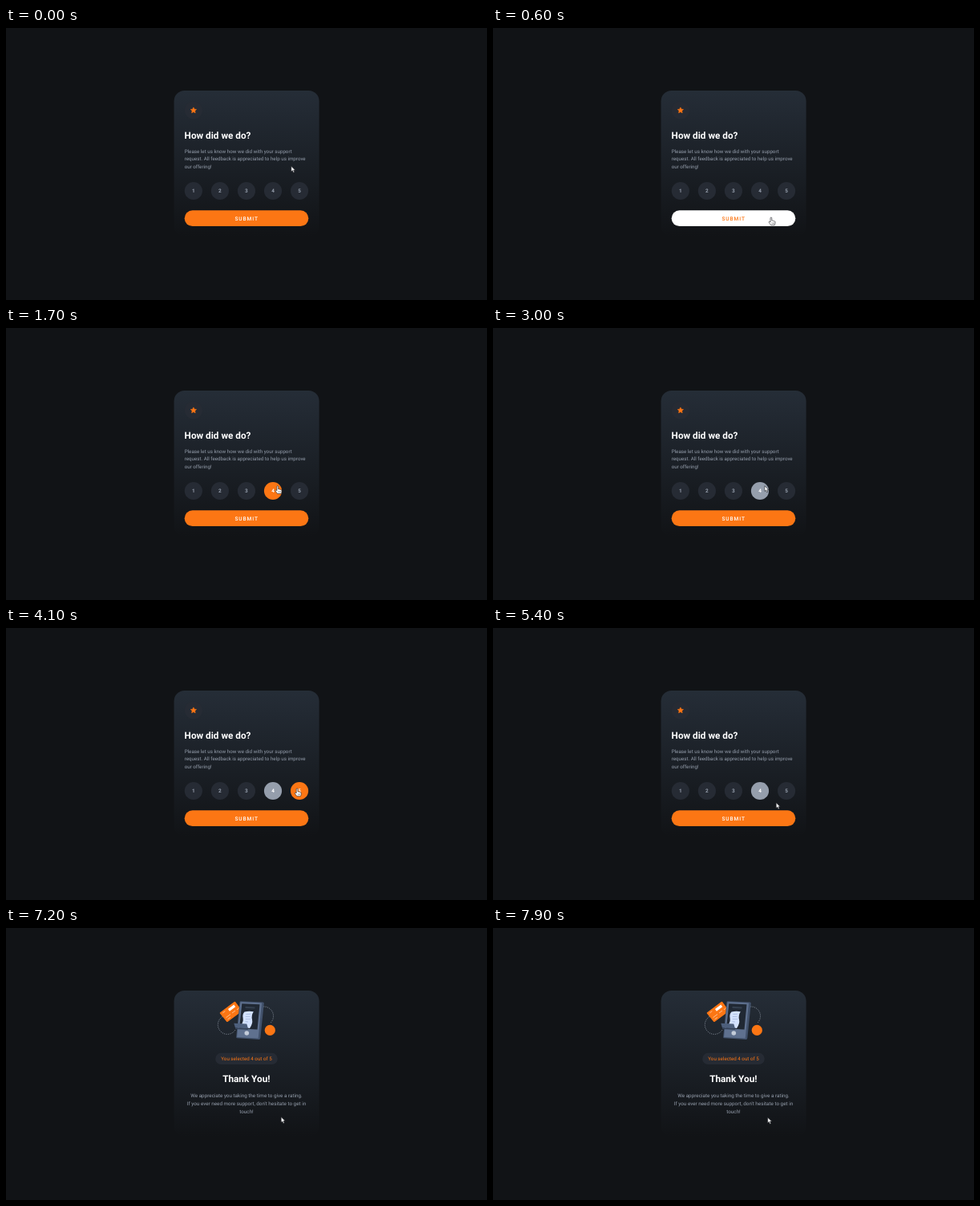
An HTML page for the animation above (8000 ms loop, 600 px wide and 339 px high).

```html
<!DOCTYPE html>
<html lang="en">
<head>
<meta charset="utf-8">
<title>Rating card</title>
<style>
  html, body { margin: 0; width: 100%; height: 100%; overflow: hidden; background: #111316; }
  svg { display: block; width: 600px; height: 339px; }
  text { font: 400 6.23px Roboto, "Open Sans", sans-serif; fill: #959eac; text-rendering: geometricPrecision; }
  .title { font-weight: 700; font-size: 11.75px; fill: #fff; }
  .mid { text-anchor: middle; }
  .note { font-size: 6.32px; }
  .disc { fill: #262b34; }
  .orange, .hot .disc { fill: #fc7614; }
  .rate text { font-weight: 700; font-size: 6.4px; }
  .hot text, .picked text { fill: #fff; }
  .picked .disc { fill: #959eac; }
  #submit rect { fill: #fc7614; }
  #submit text { font-weight: 500; font-size: 6.6px; letter-spacing: .88px; fill: #fff; }
  #submit.over rect { fill: #fff; }
  #submit.over text { fill: #fc7614; }
  .dots { fill: none; stroke: #b9c2d0; stroke-width: .8; stroke-dasharray: .9 1.5; }
  #arrow, #hand { fill: #fff; stroke: #1b1d22; stroke-width: .6; stroke-linejoin: round; }
</style>
</head>
<body>
<svg viewBox="0 0 600 339">
  <defs>
    <linearGradient id="shade" x2="0" y2="1">
      <stop stop-color="#252d37"/>
      <stop offset="1" stop-color="#111316"/>
    </linearGradient>
  </defs>
  <rect width="600" height="339" fill="#111316"/>
  <rect x="209.6" y="78" width="181" height="182" rx="13.2" fill="url(#shade)"/>

  <g id="form">
    <circle class="disc" cx="233.9" cy="102.5" r="11.1"/>
    <path id="star" class="orange" stroke="#fc7614" stroke-width=".6" stroke-linejoin="round"/>
    <text class="title" x="222.6" y="137.5">How did we do?</text>
    <text x="222.7" y="155.5">Please let us know how we did with your support</text>
    <text x="222.7" y="165.4">request. All feedback is appreciated to help us improve</text>
    <text x="222.7" y="175.4">our offering!</text>
    <g id="rates"></g>
    <g id="submit">
      <rect x="222.7" y="227.3" width="154.6" height="19.8" rx="9.9"/>
      <text x="285.5" y="239.5">SUBMIT</text>
    </g>
  </g>

  <g id="thanks">
    <path class="dots" d="M270 110.5A11.8 11.8 0 1 0 286.5 126.2M319 98.300A11.800 11.800 0 0 1 330 118.200"/>
    <!-- payment card -->
    <path class="orange" d="M267.100 105.300 284.700 91.900Q285.600 91.300 286.300 92.200L293.900 102.600Q294.400 103.500 293.600 104.200L276.700 116.800Q275.700 117.400 275 116.500L266.900 106.500Q266.400 105.800 267.100 105.300Z"/>
    <path d="M277 101.100 284.300 95.600 286.200 98.200 278.900 103.700Z" fill="#fff"/>
    <path d="M270.300 105.900 273.300 103.600M274.500 111.600 280 107.500M282 106 286 103M276.500 113.900 280 111.300M288 101.800 290.500 100" stroke="#ffc08e"/>
    <!-- terminal -->
    <path d="M293 91.200 320.500 92.500Q322 92.600 321.800 94L317.300 137.300Q317.100 139 315.500 138.900L288.500 137.300Q287 137.200 287.200 135.700L291.500 92.500Q291.700 91.200 293 91.200Z" fill="#42526c"/>
    <path d="M292.500 92.300 319 93.600 314.700 137.600 288.100 136Z" fill="#5f718f"/>
    <path d="M294.300 94.200 316.500 95.200 313.500 126.600 291 125.300Z" fill="#202833"/>
    <path d="M298.600 97.800 310.600 98.400 310.400 100.500 298.400 99.900Z" fill="#343f4e"/>
    <!-- receipt and slot -->
    <path d="M297.500 104.500Q303 103 308.800 104.200 305.800 109 307 114T304 125L292.500 122.500Q296.500 117 295.600 112T297.500 104.500Z" fill="#d3e2ff"/>
    <path d="M299.500 107.500 305 107.300M298.800 110.500 304.500 110.400M298.800 113.500 305 113.600M298.600 116.700 302 117" stroke="#9fb2d6" stroke-width=".7"/>
    <path d="M284.300 118.700 300.300 119.500 302 125.200 286 124.500Z" fill="#4d5f7c"/>
    <path d="M286 124.500 302 125.200 301.900 126.700 286 126Z" fill="#354359"/>
    <circle cx="300.300" cy="131" r="2.800" fill="#c3ccd9"/>
    <circle class="orange" cx="329.300" cy="127.400" r="6.600"/>

    <rect class="disc" x="261.200" y="155.800" width="77.600" height="14.200" rx="7.100"/>
    <text class="mid orange" x="300" y="165">You selected 4 out of 5</text>
    <text class="title mid" x="299.800" y="192.300">Thank You!</text>
    <text class="mid note" x="300" y="210.500">We appreciate you taking the time to give a rating.</text>
    <text class="mid note" x="300" y="220.500">If you ever need more support, don't hesitate to get in</text>
    <text class="mid note" x="300" y="230.500">touch!</text>
  </g>

  <g id="pointer">
    <path id="arrow" d="M0 0V6.700L1.600 5.300 2.700 8 4 7.500 2.900 4.900H5Z"/>
    <g id="hand">
      <path d="M-1 .5Q0-.6 .8 .5V4.100Q1.700 3.500 2.300 4.400 3.300 3.900 3.800 4.900 5 4.600 5 5.800V7.600Q4.700 8.600 4.200 9.700H-.4Q-1.400 8.200-2.600 6.600-3.300 5.500-2.300 5.100-1.600 5.100-1 6Z"/>
      <path d="M1 6.500V8.300M2.300 6.500V8.300M3.500 6.500V8.300" stroke-width=".4"/>
    </g>
  </g>
</svg>
<script>
const $ = id => document.getElementById(id);
const LOOP = 8000, STEP = 100, PICK = 3000, SENT = 7200, PICKED = 4;
const rateX = n => 200.8 + 33.05 * n, RATE_Y = 203, RATE_R = 11.1;

// Pointer path: [time, x, y]
const path = [
  [0, 355.8, 172.3], [400, 348.5, 233], [600, 347, 236], [900, 352, 181],
  [1100, 352.4, 176.7], [1700, 338.9, 196.8], [3600, 338.9, 196.8],
  [4100, 363.2, 200], [5000, 363.2, 200], [5800, 343.2, 235.6],
  [7800, 343.2, 235.6], [7900, 342.7, 236.2], [LOOP, 342.7, 236.2]
];

$("star").setAttribute("d", "M" + Array.from({ length: 10 }, (_, i) => {
  const a = Math.PI * (i / 5 - .5), r = i % 2 ? 1.9 : 3.8;
  return [233.9 + r * Math.cos(a), 102.7 + r * Math.sin(a)];
}).join("L") + "Z");

$("rates").innerHTML = [1, 2, 3, 4, 5].map(n => `<g class="rate">
  <circle class="disc" cx="${rateX(n)}" cy="${RATE_Y}" r="${RATE_R}"/>
  <text class="mid" x="${rateX(n)}" y="204.700">${n}</text></g>`).join("");
const rates = [...$("rates").children];

function pointerAt(t) {
  const i = path.findIndex(p => p[0] > t);
  const [t0, x0, y0] = path[i - 1], [t1, x1, y1] = path[i];
  const u = (t - t0) / (t1 - t0), k = u * u * (3 - 2 * u);
  return [x0 + (x1 - x0) * k, y0 + (y1 - y0) * k];
}

const show = (id, on) => $(id).style.display = on ? "" : "none";

function draw(now) {
  const t = Math.floor(now % LOOP / STEP) * STEP;
  const [x, y] = pointerAt(t);
  const sent = t >= SENT;
  const onButton = !sent && y > 227.3 && y < 247;
  let hot = false;
  rates.forEach((el, i) => {
    const n = i + 1;
    const picked = n === PICKED && t >= PICK;
    const over = !sent && !picked && Math.hypot(x - rateX(n), y - RATE_Y) < RATE_R;
    el.classList.toggle("picked", picked);
    el.classList.toggle("hot", over);
    hot ||= over;
  });
  $("submit").classList.toggle("over", onButton);
  show("form", !sent);
  show("thanks", sent);
  show("hand", hot || onButton);
  show("arrow", !hot && !onButton);
  $("pointer").setAttribute("transform", `translate(${x} ${y})`);
}

const start = performance.now();
(function tick() {
  draw(performance.now() - start);
  requestAnimationFrame(tick);
})();
</script>
</body>
</html>
```
